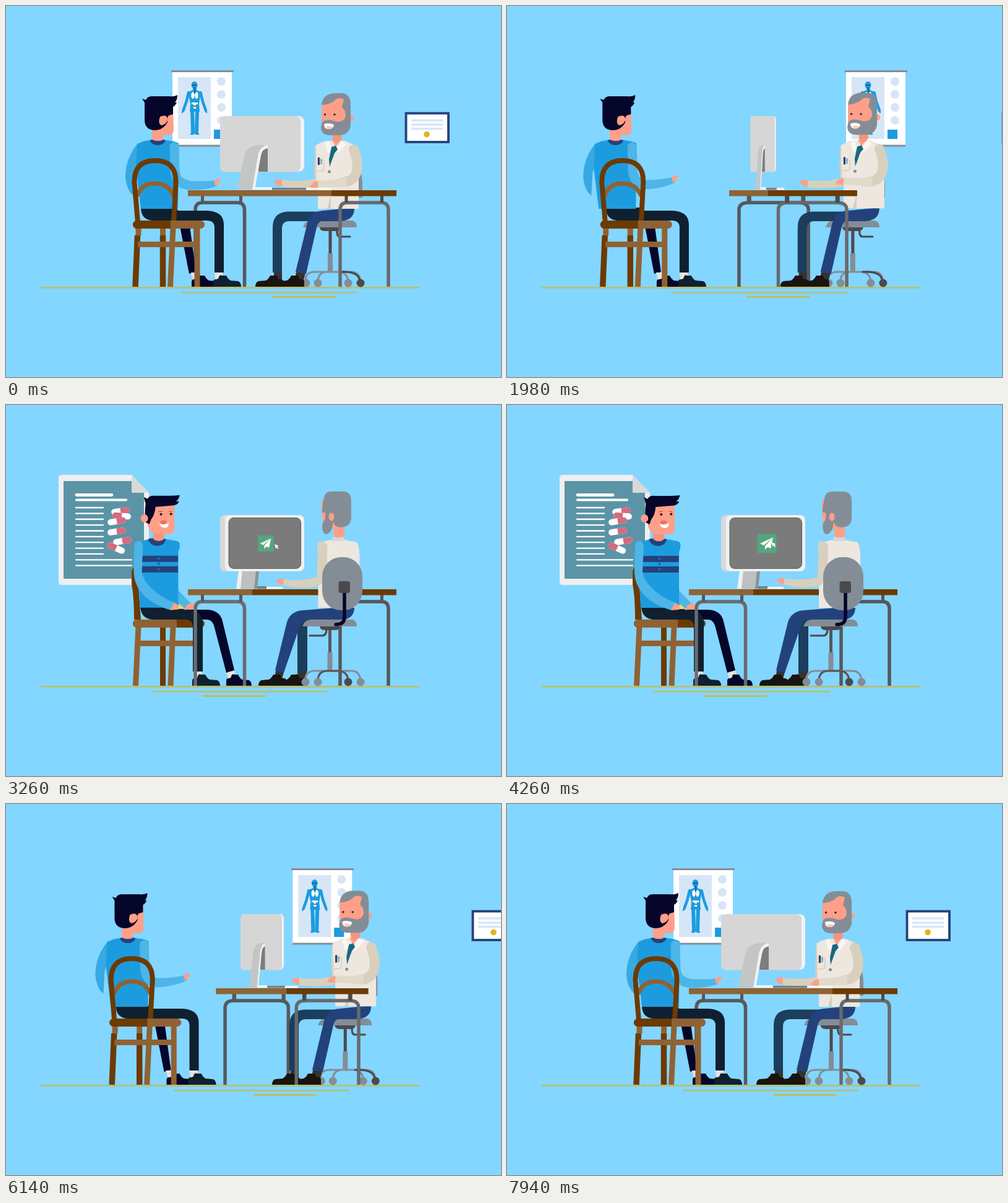
Animation of 800x600 px, one loop 7980 ms. Source, as an HTML page:

```html
<!DOCTYPE html>
<html lang="en">
<head>
<meta charset="utf-8">
<title>Consultation</title>
<style>
html, body { margin: 0; width: 100%; height: 100%; overflow: hidden; background: #83d6ff; }
svg { display: block; }
.line { fill: none; stroke-linecap: round; stroke-linejoin: round; }
.frame { fill: none; stroke-width: 5.5; vector-effect: non-scaling-stroke; }
</style>
</head>
<body>
<!-- data-m: "x k [x k]" shifts each x by k while turning; data-s: head sway; data-r: "cx cy angle" arm sway -->
<svg width="800" height="600" viewBox="0 0 800 600">
<defs>
  <path id="shoe" d="M0 0V-8Q0-12 4-12Q9-12 9-16Q11-20 14-18H21Q24-12 28-10L40-9Q45-7 45 0Z"/>
  <g id="pill"><rect x="-15" y="-5" width="30" height="10" rx="5" fill="#fff"/><path d="M0-5H10A5 5 0 0 1 10 5H0Z" fill="#d56a80"/></g>
  <g id="base" class="line" stroke="#848d96" stroke-width="3.2">
    <path d="M484 446Q483 430 499 430H558Q572 430 573 446M504 446Q504 431 518 430M553 446Q552 431 538 430"/>
  </g>
</defs>

<path d="M56 455.5H668" stroke="#ccb83f" stroke-width="2.2"/>

<g id="front">
  <path data-m="284 -24" d="M284 463.5H568" stroke="#c4b956" stroke-width="2"/>
  <path data-m="431 -56" d="M431 470.7H532" stroke="#d9b324" stroke-width="2.2"/>

  <g data-m="317 360">
    <path d="M269 106H365V226H269Z" fill="#fff"/>
    <path d="M267 105.5H368M269 226H365" stroke="#848d96" stroke-width="3"/>
    <path d="M278 115H331V215H278Z" fill="#d6e6f7"/>
    <g fill="#d6e6f7"><circle cx="348" cy="122" r="7"/><circle cx="348" cy="143" r="7"/><circle cx="348" cy="164" r="7"/><circle cx="348" cy="185" r="7"/></g>
    <path d="M336 200H352V215H336Z" fill="#1c9cdf"/>
    <g fill="#1c9cdf"><ellipse cx="304.5" cy="128" rx="5" ry="6"/><path d="M302 132H308V136L315 139L312 158L313 171H297L298 158L294 139L302 136Z"/></g>
    <g class="line" stroke="#1c9cdf"><path d="M295 140L291.500 155L286.500 169M314.500 140L318 155L323 169" stroke-width="4.500"/><path d="M301 170L301.500 185L302 205M309 170L308.500 185L308 205" stroke-width="6"/><path d="M299 207H302M308 207H311M286 170L285 172M323 170L324 172" stroke-width="2.500"/></g>
    <g fill="#fff"><ellipse cx="302" cy="144.500" rx="2.700" ry="5.500"/><ellipse cx="308" cy="144.500" rx="2.700" ry="5.500"/><path d="M300 156H310V159H307V166H303V159H300Z"/></g>
    <path d="M301 128H308M305 131V142M303 162H307" stroke="#174b7e" stroke-width="1.300"/>
  </g>

  <g data-m="680 200">
    <rect x="646.500" y="173.500" width="68.500" height="46.500" fill="#fff" stroke="#24417b" stroke-width="3.800"/>
    <path d="M655 185H706M655 192H706M655 198.500H706" stroke="#d6e6f7" stroke-width="3.500"/>
    <circle cx="680" cy="207.500" r="4.800" fill="#e0b321"/>
  </g>

  <g data-m="306 89 385 131" stroke="#56585d">
    <path class="frame" d="M306 454V330Q306 318 317 318H374Q385.500 318 385.500 330V454"/><path d="M317.500 307V318M379.500 307V318" stroke-width="5"/>
  </g>

  <g data-m="524 45">
    <path d="M560 258Q576 258 576 290V310H560Z" fill="#848d96"/>
    <path d="M524 364V402" stroke="#4a4a4e" stroke-width="5"/><path d="M524 400V430" stroke="#848d96" stroke-width="8"/>
    <use href="#base"/>
    <path class="line" d="M540 430Q571 428 572 446M535 362Q534 373 540 373H556" stroke="#4a4a4e" stroke-width="3.200"/>
    <g fill="#848d96"><circle cx="485" cy="448" r="6.500"/><circle cx="504" cy="448" r="6.500"/><circle cx="553" cy="448" r="6.500"/></g><circle cx="573" cy="448" r="6.500" fill="#4a4a4e"/>
    <path d="M507 357H541Q540 364 533 364H515Q507 364 507 357Z" fill="#4a4a4e"/>
    <path d="M480 358Q483 347 493 347H560Q567 349 567 358Z" fill="#848d96"/>
  </g>
  <g data-m="490 50">
    <path d="M433 430H446V443H433ZM469 430L484 432L481 443H467Z" fill="#333"/>
    <g fill="#1a1410"><use href="#shoe" transform="translate(448 454) scale(-1 1)"/><use href="#shoe" transform="translate(482 454) scale(-1 1)"/></g>
    <path d="M515 332.500H455Q431 334 431 358V431H446V360Q446 348 458 348H515Z" fill="#1b3e5c"/>
    <path d="M563 326Q564 348 537 348H510Q504 349 502 358L485 433L468 430L487 351Q492 332 512 331Z" fill="#23427c"/>
  </g>
  <g data-m="530 50">
    <g data-s="1.200">
      <path d="M500 226Q512 218 522 218H548L565 226L570 245V328H504V290L499 275Z" fill="#ede7df"/>
      <path d="M521 218L529 235L543 218L550 223L536 238L527 232L520 238L515 222Z" fill="#f8f6f2"/>
      <path d="M527 217L541 217L533 228Z" fill="#ff9f88"/>
      <path d="M526 228L533 226L536 232L531 238L523 260L522 248Z" fill="#17697f"/>
      <path class="line" d="M503 250H514V264Q513 267 508 267H503" stroke="#d5cdbd" stroke-width="1.500"/>
      <path d="M505.500 245V257" stroke="#24417b" stroke-width="3.200"/><path d="M509.500 247V256" stroke="#6a9db2" stroke-width="2"/>
      <circle cx="522.500" cy="268" r="2.500" fill="#848d96"/><path d="M525 306L519 328H525Z" fill="#d5cdbd"/>
      <g data-r="500 285 -1.500">
        <path d="M501 224Q497 255 499 280Q470 285 446 281L444 292Q475 297 502 293Z" fill="#d8d0bd"/>
        <path d="M446 281Q438 279 433 284Q432 286 437 287L440 291H446Z" fill="#ff9f88"/>
      </g>
      <path class="line" d="M562 232Q571 255 566 270Q561 284 545 285" stroke="#d8d0bd" stroke-width="16"/>
      <g data-r="550 286 5"><path d="M550 277Q525 283 503 282L502 293H550Z" fill="#e1d9c9"/><path d="M504 283Q496 284 491 292L494 294H504Z" fill="#ff9f88"/></g>
    </g>
    <g data-s="2.300">
      <path d="M527 200H543V214Q536 226 528 216Z" fill="#f5947e"/>
      <ellipse cx="557" cy="181" rx="5" ry="5" fill="#ff9f88"/>
      <path d="M510 160Q520 144 546 147L553 170V196Q550 208 530 208Q511 207 510 195Z" fill="#ff9f88"/>
      <path d="M510 160Q512 141 533 141H543Q557 142 557 160V193Q554 209 538 209H522Q510 208 509 197Q510 188 513 186Q520 182 534 187Q548 188 549 176L548 170L543 163L546 151Q536 146 530 154Q521 160 510 160Z" fill="#848d96"/>
      <path d="M514 191Q522 188 530 192Q529 200 520 199Q514 198 514 191Z" fill="#fff"/><path d="M517 195Q522 193 528 196Q525 200 520 199Z" fill="#ffc9ae"/>
      <circle cx="515.500" cy="175.500" r="1.800" fill="#333"/><circle cx="531" cy="175.500" r="1.800" fill="#333"/>
    </g>
  </g>

  <g data-m="540 -131 618 -89" stroke="#68696e">
    <path class="frame" d="M540 454V330Q540 318 551 318H607Q618 318 618 330V454"/><path d="M550 307V318M607.500 307V318" stroke="#4a4a4e" stroke-width="5"/>
  </g>
  <path data-m="294 84 526 -135" d="M294 298H526V307.500H294Z" fill="#906233"/>
  <path data-m="526 -135 631 -84" d="M526 298H631V307.500H526Z" fill="#6d3a02"/>
  <g data-m="346 61 482 -61">
    <rect x="450" y="178" width="32" height="90" rx="9" fill="#f2f2f2"/>
    <rect x="346" y="178" width="130" height="90.500" rx="8" fill="#d6d6d6"/>
    <path d="M408 230H423V268H408Z" fill="#7d7d7d"/>
    <path d="M380 297H402L412 242Q414 231 423 230V225H410Q392 226 387 242Z" fill="#f2f2f2"/>
    <path d="M374 297H398L407 243Q409 229 421 225H408Q389 226 385 242Z" fill="#c4c6c6"/>
    <path d="M402 293H430V297H402ZM485 294H526V297.500H485Z" fill="#f4f4f4"/><path d="M430 294H485V297.500H430Z" fill="#7b8084"/>
  </g>

  <g data-m="300 -75">
    <path d="M281 356H297L307 430L296 433Z" fill="#06052a"/>
    <path d="M299 431H311V442H302ZM337 430H350V443H338Z" fill="#e7e3dc"/>
    <use href="#shoe" x="300" y="454" fill="#06052a"/><use href="#shoe" x="335" y="454" fill="#0f2030"/>
    <path d="M218 326H275L278 331H325Q351 332 352 352V431H337V357Q336 347 326 347H236Q218 345 218 326Z" fill="#0f2030"/>
  </g>
  <g data-m="240 -90">
    <path d="M213 222Q192 248 193 278Q195 298 206 307L208 270L216 245Z" fill="#36a9e2"/>
    <path d="M212 223Q224 217 234 217H258Q272 218 279 222L278 328H218L210 262Z" fill="#1c9cdf"/>
    <path class="line" d="M272 228L273 268Q276 287 293 289" stroke="#4db5e8" stroke-width="15"/>
    <g data-r="284 288 -5.500">
      <path d="M288 282Q315 285 338 282L341 291Q320 299 290 297Z" fill="#4db5e8"/>
      <path d="M336 283Q340 278 346 280Q349 282 344 286L341 291L338 290Z" fill="#ff9f88"/>
    </g>
    <path d="M232 217Q245 213 258 217Q255 225 245 225Q236 225 232 217Z" fill="#24417b"/>
    <path d="M236 195L250 165H270L271 201Q270 209 262 209H253V217Q244 220 236 216Z" fill="#ff9f88"/>
    <path d="M220 150L226 152Q229 145 237 146H264Q271 147 277 144Q277 152 273 156L276 156Q273 162 270 163V175L263 177Q260 180 261 188Q254 201 240 201Q224 200 224 184V156Z" fill="#06052a"/>
    <path d="M249 179Q261 174 261 184Q260 191 251 193Q245 190 249 179Z" fill="#ff9f88"/>
  </g>
  <g data-m="250 -70">
    <path d="M212.500 371L209 454M253.500 371V454" stroke="#6d3a02" stroke-width="9.500"/>
    <path d="M214 358V371M253.500 358V371M270 358L265.500 454M309 358V454M213 385.500H309" stroke="#906233" stroke-width="9"/>
    <path class="line" d="M213 305Q220 287 241 287Q262 287 270 305" stroke="#94612c" stroke-width="7"/>
    <path class="line" d="M213 350L207.500 285Q207 250 241 250Q275 250 274.500 285L271 350" stroke="#6d3a02" stroke-width="8"/>
    <rect x="205" y="347" width="116" height="13" rx="6.500" fill="#906233"/><path d="M266 347H211.500A6.500 6.500 0 0 0 211.500 360H266Z" fill="#6d3a02"/>
  </g>
</g>

<g id="back">
  <path data-m="236 22" d="M236 463.500H522" stroke="#ceb943" stroke-width="2.200"/>
  <path data-m="318 50" d="M318 470.700H420" stroke="#d9b324" stroke-width="2.200"/>

  <g data-m="85 -108 231 -146">
    <path d="M90 113H203L231 142V286Q231 291 226 291H90Q85 291 85 286V118Q85 113 90 113Z" fill="#efefef"/>
    <path d="M93 123H203V142H223V281H93Z" fill="#5b94a6"/><path d="M203 113L231 142H203Z" fill="#d9d9d9"/>
    <g class="line" stroke="#fff"><path d="M114 145.500H171" stroke-width="4.800"/><path d="M114 153.500H194" stroke-width="4"/>
      <path id="rows" stroke-width="2.300"/></g>
    <use href="#pill" transform="translate(185 171.500) rotate(-8)"/><use href="#pill" transform="translate(187 179.500) rotate(184)"/>
    <use href="#pill" transform="translate(179 188) rotate(-9)"/><use href="#pill" transform="translate(179 204.500) rotate(-8)"/>
    <use href="#pill" transform="translate(188 220) rotate(-10)"/><use href="#pill" transform="translate(178 231.500) rotate(204)"/>
  </g>

  <g data-m="540 -131 618 -89" stroke="#55575c">
    <path class="frame" d="M540 454V330Q540 318 551 318H607Q618 318 618 330V454"/><path d="M550 307V318M607.500 307V318" stroke-width="5"/>
  </g>

  <path data-m="210 -45" d="M203 270Q205 258 212 265L218 347H207Q207 310 203 290Z" fill="#6d3a02"/>
  <path data-m="253 -90" d="M253.500 358V454" stroke="#6d3a02" stroke-width="9"/>
  <path data-m="213 -48" d="M214 358L209.500 454" stroke="#906233" stroke-width="9"/>
  <path data-m="268 -17" d="M270 358L266 454" stroke="#906233" stroke-width="9"/>
  <g data-m="250 -50">
    <path d="M216 385.500H306" stroke="#906233" stroke-width="9"/>
    <rect x="205" y="347" width="116" height="13" rx="6.500" fill="#6d3a02"/><path d="M276 347H211.500A6.500 6.500 0 0 0 211.500 360H276Z" fill="#906233"/>
  </g>
  <g data-m="360 -70">
    <path d="M356 430H369L371 443H359Z" fill="#e7e3dc"/>
    <use href="#shoe" transform="translate(356 454) scale(.91 1)" fill="#06052a"/>
    <path d="M285 331H325Q346 332 350 350L369 429L356 433L337 360Q334 347 324 347H285Z" fill="#06052a"/>
  </g>
  <g data-m="306 -42">
    <path d="M303 430H316V443H303Z" fill="#e7e3dc"/><use href="#shoe" x="301" y="454" fill="#0f2030"/>
    <path d="M217 326H280L300 332Q317 334 318 352V431H302V358Q301 347 290 347H236Q218 345 217 326Z" fill="#0f2030"/>
  </g>
  <g data-m="205 -34 281 -72">
    <g data-s="1.500">
      <path d="M278 300L300 323L290 332L268 322Z" fill="#4db5e8"/>
      <path d="M292 323Q300 319 306 325V331H288Z" fill="#ff9f88"/>
      <path d="M214 223Q226 217 234 217H258Q270 219 278 221Q283 226 278 238V328H216L212 245Z" fill="#1c9cdf"/>
      <path d="M219 244H277.500V254H219ZM219 261H277.500V271H219Z" fill="#24417b"/>
      <g fill="#176c9f"><circle cx="246.500" cy="248.500" r="2.200"/><circle cx="246.500" cy="257" r="2.200"/><circle cx="246.500" cy="266" r="2.200"/></g>
      <path d="M207 224Q216 215 221 226L219 270Q222 285 234 296Q250 312 273 320L266 332Q240 325 222 308Q205 290 206 265Z" fill="#4db5e8"/>
      <path d="M271 320L279 324L278 331L265 332Z" fill="#ff9f88"/><path d="M280 322L289 330H277Z" fill="#f4d46a"/>
      <path d="M229 217Q243 213 258 217Q256 228 243 228Q232 227 229 217Z" fill="#24417b"/>
    </g>
  </g>
  <g data-m="250 -50">
    <g data-s="5.500">
      <path d="M236 200H254V217Q245 224 236 217Z" fill="#f5947e"/>
      <path d="M224 152H270L271 198Q271 209 262 209H243Q229 208 227 191Z" fill="#ff9f88"/>
      <path d="M221 149L227 152Q230 146 239 147H262Q271 147 279 146Q278 153 273 156L278 156Q276 163 265 163L240 165Q239 178 233 185L230 193L224 190Q222 175 224 160Z" fill="#06052a"/>
      <ellipse cx="222" cy="183.500" rx="6" ry="6.500" fill="#ff9f88"/>
      <circle cx="249" cy="177" r="2" fill="#33151c"/><circle cx="265" cy="176.500" r="2" fill="#33151c"/>
      <path class="line" d="M245 173L251 172M262 172L267 173" stroke="#9b4b40" stroke-width="1"/>
      <ellipse cx="253" cy="190" rx="5.500" ry="3.500" fill="#f5705a"/>
      <path d="M246 192Q254 195 261 191Q262 199 254 199Q248 198 246 192Z" fill="#fff"/>
    </g>
  </g>

  <path data-m="294 84 398 135" d="M294 298H398V307.500H294Z" fill="#906233"/>
  <path data-m="398 135 631 -84" d="M398 298H631V307.500H398Z" fill="#6d3a02"/>
  <g data-m="306 89 385 131" stroke="#6a6b70">
    <path class="frame" d="M306 454V330Q306 318 317 318H374Q385.500 318 385.500 330V454"/><path d="M317.500 307V318M379.500 307V318" stroke="#55575c" stroke-width="5"/>
  </g>

  <g data-m="346 61 482 -61">
    <path d="M376 268H408L404 297H372Z" fill="#f0f0f0"/><path d="M382 268H408L404 297H379Z" fill="#bcc0c0"/>
    <path d="M404 268H409L406 297H401Z" fill="#8d9292"/>
    <rect x="346" y="178" width="60" height="91" rx="8" fill="#d9d9d9"/><rect x="354" y="178" width="128" height="91" rx="8" fill="#f0f0f0"/>
    <rect x="360" y="182.500" width="116.500" height="82" rx="8" fill="#7b7b7b" stroke="#5d5d5d" stroke-width="1"/>
    <g id="icon"><path d="M-15.500-15.500H15.500V15.500H-15.500Z" fill="#55a57c"/><path d="M10-10L-11 0L-5 3ZM10-10L-3 4V10L1 6ZM10-10L0 5L6 8Z" fill="#fff"/></g>
    <path id="cursor" d="M0 0L1.500 7.500L3 5.500L5.500 8L6.500 7L4 4.500L6.500 3Z" fill="#fff"/>
    <path d="M406 293H421V297.500H406Z" fill="#7b8084"/><path d="M421 294H447V297.500H421Z" fill="#f4f4f4"/>
  </g>

  <g data-m="490 50">
    <path d="M436 429L449 432L446 443H434ZM471 430H486V443H472Z" fill="#333"/>
    <g fill="#1a1410"><use href="#shoe" transform="translate(482 454) scale(-1 1)"/><use href="#shoe" transform="translate(453 454) scale(-1 1)"/></g>
    <path d="M471 343H500L487 352V431H471Z" fill="#1b3e5c"/>
    <path d="M563 326Q564 348 537 348H487Q477 348 474 360L449 433L435 429L454 351Q460 333 480 332L505 330Z" fill="#23427c"/>
  </g>
  <g data-m="535 48">
    <g data-s="1.500">
      <path d="M503 224Q520 218 532 218H545L566 222Q571 226 571 250V300L563 328H504V250Z" fill="#ede7df"/>
      <path d="M528 213Q537 209 546 213V220H526Z" fill="#d4d6d8"/>
      <path d="M504 222Q514 217 519 228L518 265Q516 285 504 293L502 275Z" fill="#d8d0bd"/>
      <g data-r="508 286 -5">
        <path d="M446 280Q480 286 507 277L510 290Q480 301 446 289Z" fill="#d8d0bd"/>
        <path d="M448 280Q439 278 436 284L440 286L442 289H448Z" fill="#ff9f88"/>
      </g>
    </g>
    <g data-s="3">
      <path d="M529 190H546V213Q537 216 529 213Z" fill="#ff9f88"/>
      <path d="M510 152H530V200H514Q508 180 509 160Z" fill="#ff9f88"/>
      <path d="M513 152Q514 140 525 140H545Q557 141 557 156V183Q556 197 541 198Q529 198 528 188L526 200Q522 209 516 209Q510 208 510 195L511 191Q517 185 515 174H510Q510 160 513 152Z" fill="#848d96"/>
      <ellipse cx="525" cy="181" rx="4.500" ry="6.500" fill="#ff9f88"/>
    </g>
  </g>
  <g data-m="524 43">
    <path d="M523.500 364V402" stroke="#55575c" stroke-width="5"/><path d="M523.500 400V430" stroke="#848d96" stroke-width="8"/>
    <use href="#base"/>
    <path class="line" d="M504 446Q504 431 518 430H538Q552 431 553 446" stroke="#55575c" stroke-width="3"/>
    <path class="line" d="M518 362Q518 373 511 373H491" stroke="#4a4a4e" stroke-width="3.200"/>
    <g fill="#848d96"><circle cx="484" cy="448" r="6.500"/><circle cx="504" cy="448" r="6.500"/><circle cx="573" cy="448" r="6.500"/></g><circle cx="553" cy="448" r="6.500" fill="#4a4a4e"/>
    <path d="M507 357H541Q540 364 533 364H515Q507 364 507 357Z" fill="#4a4a4e"/>
    <path d="M479 358Q483 347 493 347H560Q567 349 567 358Z" fill="#848d96"/>
  </g>
  <g data-m="511 94 576 42">
    <rect x="511" y="246" width="65" height="86" rx="31" fill="#848d96"/>
    <path class="line" d="M547 300V343Q547 355 533 355" stroke="#06052a" stroke-width="5.500"/>
    <rect x="537.500" y="285" width="18.500" height="19" rx="4" fill="#4a4a4e"/>
  </g>
</g>
</svg>
<script>
const LOOP = 7980, TURNS = [2038, 6008], HALF = 1146;
const $ = id => document.getElementById(id);
const all = (key, build) => [...document.querySelectorAll(`[data-${key}]`)]
  .map(el => ({ el, v: el.dataset[key].split(' ').map(Number) }));
const moved = all('m'), swayed = all('s'), turned = all('r');

const smooth = (t, a, b) => {
  const u = Math.min(1, Math.max(0, (t - a) / (b - a)));
  return u * u * (3 - 2 * u);
};
const set = (el, value) => el.setAttribute('transform', value);

let rows = '';
for (let i = 0; i < 11; i++) rows += `M113 ${166 + i * 9.37}H${i < 9 ? 157 : 203}`;
$('rows').setAttribute('d', rows);

function draw(t) {
  const nearest = Math.min(...TURNS.map(c => Math.abs(t - c)));
  const e = Math.max(0, 1 - nearest / HALF) ** 5;
  const w = (1 - Math.cos(4 * Math.PI * t / LOOP)) / 2;
  const isBack = t >= TURNS[0] && t < TURNS[1];
  $('front').style.display = isBack ? 'none' : '';
  $('back').style.display = isBack ? '' : 'none';

  for (const { el, v: [x0, k0, x1 = x0 + 1, k1 = k0] } of moved) {
    const a = 1 + (k1 - k0) * e / (x1 - x0);
    set(el, `matrix(${a} 0 0 1 ${x0 + k0 * e - a * x0} 0)`);
  }
  for (const { el, v } of swayed) set(el, `translate(${v[0] * w} ${-0.7 * w})`);
  for (const { el, v: [x, y, angle] } of turned) set(el, `rotate(${angle * w} ${x} ${y})`);

  const size = 0.82 * smooth(t, 2300, 2500) + 0.18 * smooth(t, 3200, 3500) - smooth(t, 4550, 4800);
  const hover = smooth(t, 2800, 3450) - smooth(t, 4700, 5300);
  set($('icon'), `translate(420 224) scale(${size})`);
  set($('cursor'), `translate(${459 - 31 * hover} ${237 - 15 * hover})`);
}

const start = performance.now();
function tick() {
  draw((performance.now() - start) % LOOP);
  requestAnimationFrame(tick);
}
tick();
</script>
</body>
</html>
```
